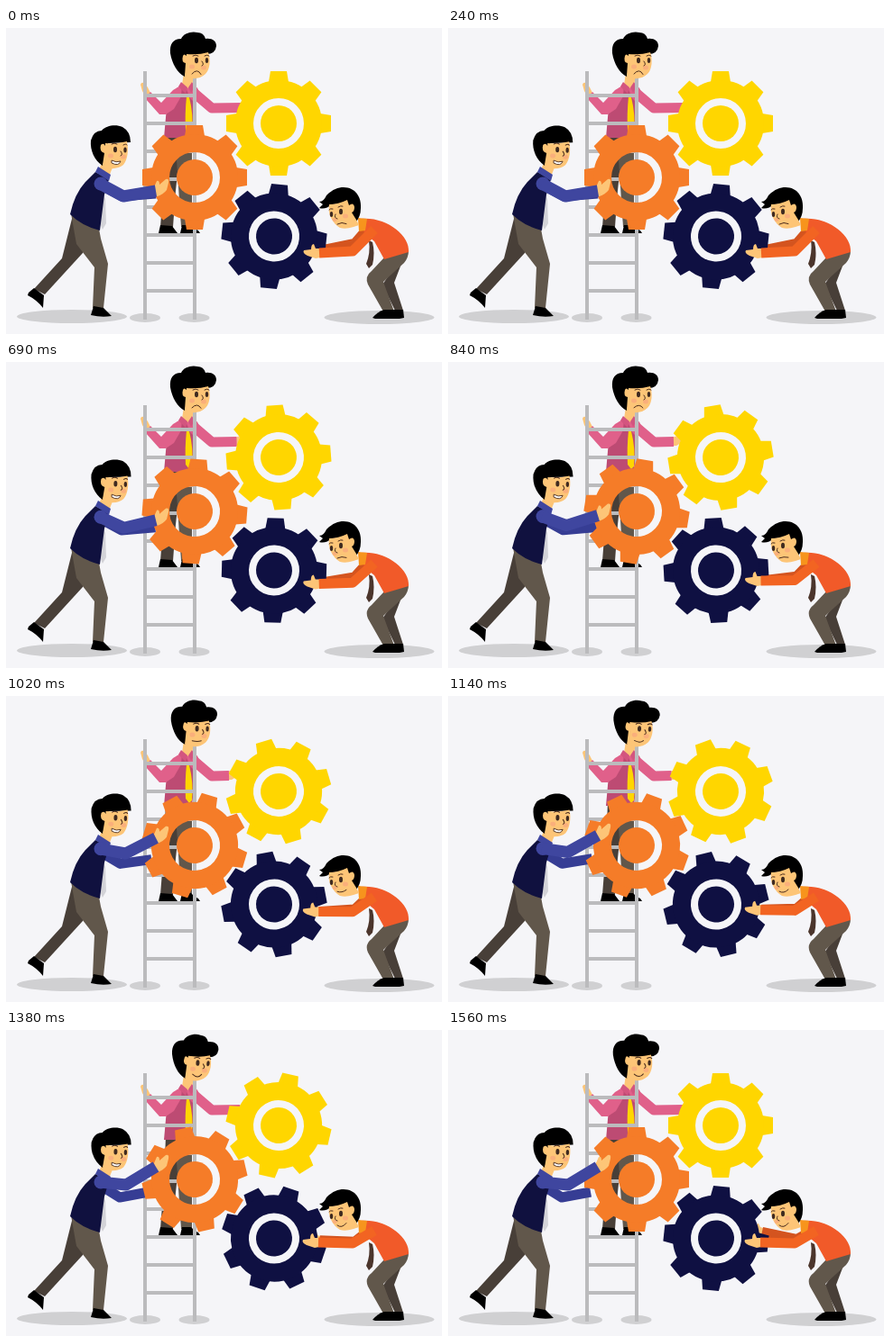
An HTML page for the animation above (1590 ms loop, 483x340 px).

```html
<!DOCTYPE html>
<html lang="en">
<head>
<meta charset="utf-8">
<title>Turning gears together</title>
<style>
  html, body { margin: 0; height: 100%; overflow: hidden; background: #f5f5f8; }
  svg { display: block; width: 100vw; height: 100vh; }
  .skin { fill: #fdc577; }
  .hair { fill: #000; }
  .eye { fill: #3f2a20; }
  .blush { fill: #f9a07e; opacity: .6; }
  .line { fill: none; stroke: #4a2c1d; stroke-width: 1; stroke-linecap: round; }
  .limb { fill: none; stroke-linejoin: round; }
  .shadow { fill: #d0d0d2; }
  .leg { fill: #61574b; }
  .leg-dark { fill: #483f38; }
</style>
</head>
<body>
<svg viewBox="0 0 483 340">
  <g class="shadow">
    <ellipse cx="73" cy="320.5" rx="61" ry="7.5"/>
    <ellipse cx="154" cy="322" rx="17" ry="5"/>
    <ellipse cx="208.500" cy="322" rx="17" ry="5"/>
    <ellipse cx="413.500" cy="321.500" rx="61" ry="7.500"/>
  </g>

  <!-- man on the ladder -->
  <path class="leg-dark" d="M177 117H195L188 180 185 221H171L175 170Z"/>
  <path class="leg" d="M187 117H206V221H194Z"/>
  <path class="hair" d="M171 219L184 220 190 228H169ZM195 219H205Q208 223 213 225L215 228H193Z"/>
  <path class="skin" d="M149 63Q150 59 154 62L157 66 160 72 155 77 151 70Z"/>
  <g id="reach">
    <path class="skin" d="M-2-4L4-6 9-3 8 2 3 5-2 5Z"/>
  </g>
  <path id="reachArm" class="limb" stroke="#e0608a" stroke-width="11"/>
  <path fill="#bd4b73" d="M190 66L207 64 211 75 206 122H175L178 88Z"/>
  <path fill="#e0608a" d="M195 63L185 69 172 83 160 71 154 78 170 96 177 96 186 90 194 76ZM199 66L207 62Q213 66 214 72L210 84 204 78Z"/>
  <path fill="#ffd600" d="M200 76L203 77Q208 97 206 116L203 119 199 114Q198 96 200 76Z"/>
  <path class="skin" d="M197 50L208 54 206 64 201 67 195 63Z"/>
  <path fill="#d3557f" d="M194 60L201 66 199 73 191 65ZM206 60L202 66 205 72 209 65Z"/>

  <path id="ladder" fill="none" stroke="#bbbbbd" stroke-width="4"/>

  <g id="topHead">
    <path class="hair" d="M198 54C190 50 184 40 182 28C181 18 185 12 194 12C196 6 206 3 212 5Q219 5 221 12C228 11 233 14 233 20Q232 29 222 29L201 40Z"/>
    <path class="skin" d="M200 29Q214 30 224 27C227 35 226 46 221 51C215 57 204 58 198 53L199 39Q194 38 196 31Q197 28 200 31Z"/>
    <ellipse class="blush" cx="219" cy="44" rx="3" ry="2.500"/>
    <ellipse class="blush" cx="206" cy="43" rx="3" ry="2.500"/>
    <ellipse class="eye" cx="211" cy="36" rx="2" ry="3.200"/>
    <ellipse class="eye" cx="222.500" cy="36" rx="1.700" ry="3"/>
    <path class="line" d="M207 31Q210 29 213 31M220 31Q223 29 225 31M217 37Q220 41 217 42"/>
    <path id="topMouth" class="line" stroke-width="1.300"/>
  </g>

  <!-- far arms pass behind the gears -->
  <path id="leftFar" class="limb" stroke="#363d94" stroke-width="11"/>
  <g id="rightFarHand"><path class="skin" d="M1-4L-2-5-4-9Q-7-9-6-4L-8 4 1 5Z"/></g>
  <path id="rightFar" class="limb" stroke="#d4541f" stroke-width="10"/>

  <g id="gears"></g>

  <!-- man on the left -->
  <path class="leg-dark" d="M74 208L100 222 85 250 43 296 31 290 62 256Z"/>
  <path class="leg" d="M72 206L103 223 105 234 113 262 108 311H96L98 266 78 240Z"/>
  <path class="hair" d="M31 289L42 297 41 311Q34 302 24 297L25 294ZM97 309L108 311 117 320Q106 322 94 319Z"/>
  <path fill="#d3d3d8" d="M107 183L110 190 111 217 107 224 103 214Z"/>
  <path fill="#10113f" d="M99 160L114 168 109 185 104 225Q84 220 71 207Q76 184 88 171Z"/>
  <path class="skin" d="M107 147L118 155 114 165 103 158Z"/>
  <path fill="#3f469f" d="M102 154L116 163 114 170 99 160Z"/>
  <g id="leftHead">
    <path class="hair" d="M107 153C98 147 93 136 94 125Q97 114 106 114C111 108 122 107 129 110Q138 115 138 127L113 128 110 142Z"/>
    <path class="skin" d="M110 128Q122 129 134 126C136 135 135 146 130 152C124 157 113 158 107 152L109 139Q103 137 105 130Q108 127 110 131Z"/>
    <ellipse class="blush" cx="130" cy="143" rx="3" ry="2.500"/>
    <ellipse class="blush" cx="116" cy="142" rx="3" ry="2.500"/>
    <ellipse class="eye" cx="121" cy="135" rx="2" ry="3.200"/>
    <ellipse class="eye" cx="132" cy="135.500" rx="1.700" ry="3"/>
    <path class="line" d="M117 129Q120 127 123 129M130 130Q133 128 134 130M127 137Q130 141 127 142"/>
    <path fill="#fff" stroke="#4a2c1d" stroke-width=".9" d="M117 147Q122 150 127 148Q125 154 117 150Z"/>
  </g>
  <g id="leftHand"><path class="skin" d="M0 6L-2-4 1-11Q4-12 4-7L11-13Q15-14 14-9L12-1Q8 4 2 6Z"/></g>
  <circle id="leftShoulder" cx="105" r="7.500" fill="#3f469f"/>
  <path id="leftNear" class="limb" stroke="#3f469f" stroke-width="13"/>

  <!-- man on the right -->
  <path class="leg-dark" d="M424 275L438 262 430 283 440 314H431L417 285Z"/>
  <path class="leg" d="M419 255L446 247Q446 255 441 261L418 282 430 315H418L401 285Q397 276 405 270Z"/>
  <path class="hair" d="M406 322Q412 315 419 313L440 313 441 322 436 323H409Z"/>
  <path fill="#4b352c" d="M402 236L406 238Q409 250 406 263L402 267 399 262Q404 250 402 236Z"/>
  <path fill="#f15a29" d="M393 212C420 209 448 230 446 249L419 257 408 237 397 228Z"/>
  <path fill="#f7941d" d="M390 211L400 212 398 225 391 226Z"/>
  <g id="rightHead">
    <path class="hair" d="M347 193C351 193 353 190 355 186C362 179 368 177 374 177C387 177 394 188 393 200Q393 210 387 216L380 206 377 195 361 196Q354 202 347 200L351 196Z"/>
    <path class="skin" d="M358 196Q368 196 378 191L380 197Q385 193 386 199Q386 204 383 205L388 213 391 219 385 221Q376 224 370 222C362 217 356 207 358 196Z"/>
    <ellipse class="blush" cx="364" cy="213" rx="2.500" ry="2"/>
    <ellipse class="blush" cx="376" cy="209" rx="3" ry="2.500"/>
    <ellipse class="eye" cx="360.500" cy="207" rx="1.700" ry="3"/>
    <ellipse class="eye" cx="371" cy="204" rx="2" ry="3.200"/>
    <path class="line" d="M358 202Q359 200 362 201M368 199Q371 197 373 198M365 207Q363 211 367 212"/>
    <path id="rightMouth" class="line"/>
  </g>
  <g id="rightHand"><path class="skin" d="M1-5L-4-5-6-10Q-9-10-9-4L-17-3Q-19 0-13 3L-4 6 1 5Z"/></g>
  <path id="rightNear" class="limb" stroke="#f26422" stroke-width="11"/>
</svg>

<script>
const LOOP = 1590, STEP = 30;
const $ = id => document.getElementById(id);
const set = (id, name, value) => $(id).setAttribute(name, value);

// Pose values at the shared key times
const times = [0, 450, 570, 840, 1020, 1260, 1380, 1560];
const tracks = {
  turn:     [0, 0, .5, 9.2, 16.5, 23, 32, 45],
  tilt:     [0, 0, 0, 0, 1.5, 3.5, 3.5, 1.5],
  nod:      [0, 1, 1, 1, 1.2, 1.2, 1.2, 1.2],
  mood:     [-1, -1, -1, -.7, .4, 1, 1, 1],
  reach:    [262, 262, 260, 250, 247, 248, 259, 262],
  leftUp:   [0, 0, .04, .36, .8, 1, 1, 1],
  leftBack: [0, 0, 0, .15, .6, 1, 1, 1],
  rightUp:  [0, 0, .05, .5, .75, 1, 1, 1],
  rightFar: [0, 0, 0, .2, .35, .55, .6, 1]
};

function poseAt(t) {
  let i = 0;
  while (i < times.length - 2 && t >= times[i + 1]) i++;
  const k = Math.min(1, (t - times[i]) / (times[i + 1] - times[i]));
  const pose = {};
  for (const name in tracks) {
    const v = tracks[name];
    pose[name] = v[i] + (v[i + 1] - v[i]) * k;
  }
  return pose;
}

// Arms are shoulder, elbow, wrist in a low and a high pose
const arms = {
  leftNear:  [[104, 173, 130, 187, 166, 181], [104, 169, 133, 172, 166, 152]],
  leftFar:   [[106, 175, 128, 187, 166, 184], [110, 176, 126, 186, 158, 180]],
  rightNear: [[408, 224, 384, 248, 347, 250], [408, 223, 384, 237, 346, 236]],
  rightFar:  [[404, 218, 386, 239, 347, 247], [404, 222, 386, 232, 348, 224]]
};

function moveArm(id, k, hand) {
  const [low, high] = arms[id];
  const p = low.map((v, i) => v + (high[i] - v) * k);
  set(id, 'd', `M${p.slice(0, 2)}L${p.slice(2, 4)}L${p.slice(4)}`);
  if (hand) set(hand, 'transform', `translate(${p.slice(4)})`);
}

// Gear: eight teeth, a ring-shaped opening and a hub
const gears = [
  { x: 302, y: 106, color: '#ffd600', start: 0, dir: -1 },
  { x: 297, y: 231.5, color: '#0f1042', start: 6, dir: -1 },
  { x: 209, y: 166, color: '#f57c28', start: 0, dir: 1 }
];
const tooth = '<path d="M-11-46L-9-58H9L11-46Z"/>';
const teeth = Array.from({ length: 8 }, (_, i) => `<g transform="rotate(${i * 45})">${tooth}</g>`).join('');
$('gears').innerHTML = gears.map(g => `<g fill="${g.color}">${teeth}
  <circle r="38" fill="none" stroke="${g.color}" stroke-width="20"/><circle r="20"/></g>`).join('');

let rungs = 'M154 48V324M209 55V324';
for (let y = 75; y < 300; y += 31) rungs += `M154 ${y}H209`;
set('ladder', 'd', rungs);

function draw(t) {
  const p = poseAt(t);
  gears.forEach((g, i) => $('gears').children[i].setAttribute('transform',
    `translate(${g.x} ${g.y}) rotate(${g.start + g.dir * p.turn})`));

  set('topHead', 'transform', `rotate(${p.tilt} 203 60)`);
  set('leftHead', 'transform', `rotate(${p.nod} 110 156)`);
  set('topMouth', 'd', `M206 ${50 - p.mood}Q212 ${49 + 5 * p.mood} 216 ${50 - p.mood * 1.5}`);
  set('rightMouth', 'd', `M367 ${217.5 - p.mood * .5}Q372 ${218 + 3 * p.mood} 377 ${216 - p.mood * 1.5}`);

  set('reachArm', 'd', `M207 71L228 89L${p.reach} 88.500`);
  set('reach', 'transform', `translate(${p.reach} 88)`);
  moveArm('leftNear', p.leftUp, 'leftHand');
  set('leftShoulder', 'cy', 173 - 4 * p.leftUp);
  moveArm('leftFar', p.leftBack);
  moveArm('rightNear', p.rightUp, 'rightHand');
  moveArm('rightFar', p.rightFar, 'rightFarHand');
}

const begin = performance.now();
function tick() {
  const t = (performance.now() - begin) % LOOP;
  draw(Math.floor(t / STEP) * STEP);
  requestAnimationFrame(tick);
}
tick();
</script>
</body>
</html>
```
